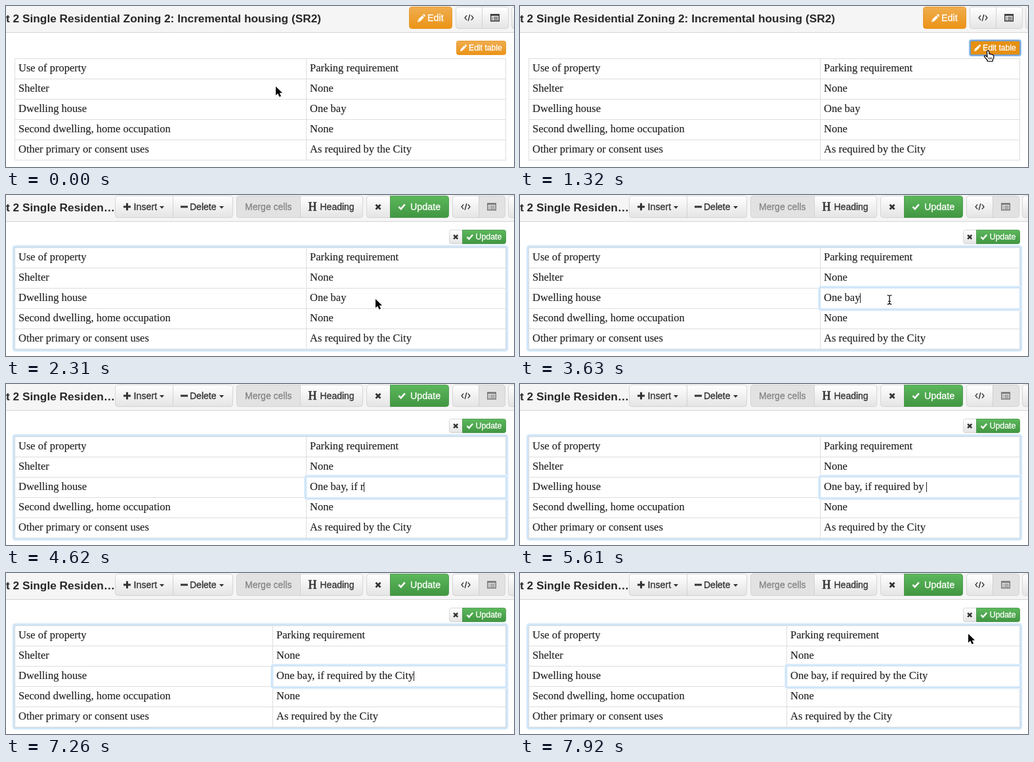
Write an HTML page that moves like this. It is 774 by 246 pixels and loops after 8000 ms.

```html
<!DOCTYPE html>
<html lang="en">
<head>
<meta charset="utf-8">
<title>Table editing</title>
<style>
  html, body { margin: 0; width: 100%; height: 100%; overflow: hidden; background: #fff; }
  svg { display: block; width: 774px; height: 246px; }
  text { white-space: pre; }
  .title { font: bold 17.3px "Liberation Sans", Arial, sans-serif; fill: #282828; }
  .label { font-family: "Liberation Sans", Arial, sans-serif; stroke-width: .3; }
  .cell { font: 16.5px "Liberation Serif", "Times New Roman", serif; fill: #222; stroke: #222; stroke-width: .15; }
</style>
</head>
<body>
<svg id="stage" viewBox="0 0 774 246" xmlns="http://www.w3.org/2000/svg"></svg>
<script>
const STEP = 330, LOOP = 8000;
const DARK = '#333', WHITE = '#fff';
const ROWS = [
  ['Use of property', 'Parking requirement'],
  ['Shelter', 'None'],
  ['Dwelling house', 'One bay'],
  ['Second dwelling, home occupation', 'None'],
  ['Other primary or consent uses', 'As required by the City']
];
const TYPED = ', if required by the City';

// Timelines: [first step, value...]
const typing = [[0, 0], [12, 1], [13, 4], [14, 6], [15, 9], [16, 13], [17, 17], [18, 21], [19, 23], [22, 25]];
const columns = [[0, 457.5], [18, 432.5], [19, 418.5], [22, 406.5]];
const carets = [[0, 0], [8, 1], [10, 0], [11, 1], [21, 0], [22, 1], [23, 0]];
const pointers = [
  [0, 'arrow', 411, 123], [1, 'arrow', 690, 79], [2, 'hand', 713, 68],
  [6, 'arrow', 629, 115], [7, 'arrow', 563, 159], [8, 'beam', 563, 160],
  [12, 'none', 0, 0], [23, 'arrow', 634, 123], [24, 'arrow', 683, 93]
];

const kinds = {
  plain: ['url(#plain)', '#ccc'],
  pressed: ['#e2e2e2', '#ccc'],
  orange: ['url(#orange)', '#e38d13'],
  orangeHot: ['#e68f12', '#c77c11'],
  green: ['url(#green)', '#3e8f3e'],
  greenHot: ['#419641', '#3e8f3e']
};

const gradient = (id, top, bottom) =>
  `<linearGradient id="${id}" x2="0" y2="1"><stop stop-color="${top}"/><stop offset="1" stop-color="${bottom}"/></linearGradient>`;

// Button with separate left and right corner radii
function button(x, y, w, h, kind, l = 4, r = 4) {
  const [fill, stroke] = kinds[kind];
  x += .5; y += .5; w -= 1; h -= 1;
  return `<path d="M${x + l} ${y}H${x + w - r}q${r} 0 ${r} ${r}V${y + h - r}q0 ${r} ${-r} ${r}H${x + l}q${-l} 0 ${-l} ${-l}V${y + l}q0 ${-l} ${l} ${-l}z" fill="${fill}" stroke="${stroke}" stroke-opacity=".75"/>`;
}

const label = (x, y, str, size = 14, fill = DARK) =>
  `<text class="label" x="${x}" y="${y}" font-size="${size}" fill="${fill}" stroke="${fill}">${str}</text>`;

const at = (x, y, body, scale = 1) => `<g transform="translate(${x} ${y}) scale(${scale})">${body}</g>`;
const line = (d, color, width) => `<path d="${d}" fill="none" stroke="${color}" stroke-width="${width}"/>`;

const pencil = `<path d="M0 12L.8 8.3 7.2 1.9 10.1 4.8 3.7 11.2zM8 1.1L9 .1q.6-.5 1.2 0L11.9 1.8q.5.6 0 1.2L10.9 4z" fill="#fff"/><path d="M1.4 9l1.6 1.6" stroke="#ec9a24"/>`;
const check = line('M1 6L4.6 9.6 11.2 2', WHITE, 2.8);
const cross = line('M1 1L8 8M8 1L1 8', DARK, 2.8);
const code = line('M-3.4-3.6L-6.4 0-3.4 3.6M3.4-3.6L6.4 0 3.4 3.6M1.3-5L-1.3 5', DARK, 1.4);
const list = color => line('M-6.3-5H6.3V5H-6.3z', color, 1.4) + line('M-6-4.2H6', color, 2.2) +
  line('M-4.5-1H-3M-2-1H4.6M-4.5 1H-3M-2 1H4.6M-4.5 3H-3M-2 3H4.6', color, 1);
const drop = `<path d="M0 0H7L3.5 4z" fill="${DARK}"/>`;

const viewBar = `<text class="title" x="0" y="24.5">t 2 Single Residential Zoning 2: Incremental housing (SR2)</text>` +
  button(614, 1, 66, 34, 'orange') + at(627, 12.5, pencil) + label(642, 23, 'Edit', 14.3, WHITE) +
  button(685, 1, 41, 34, 'plain', 4, 0) + at(705.5, 18, code) +
  button(725, 1, 41, 34, 'plain', 0, 4) + at(745, 18, list(DARK)) +
  button(770, 1, 40, 34, 'plain');

const editTable = kind => button(686, 53, 76, 22, kind, 3, 3) +
  at(692, 59, pencil, .85) + label(705, 68, 'Edit table', 12.2, WHITE);

const editBar = `<text class="title" x="0" y="24.5">t 2 Single Residen…</text>` +
  button(166, 1, 89, 34, 'plain', 4, 0) + line('M179 18H190M184.5 12.5V23.5', DARK, 3) +
  label(194.5, 23, 'Insert', 14.3) + at(234, 17, drop) +
  button(254, 1, 92, 34, 'plain', 0, 4) + line('M266 18H277', DARK, 3) +
  label(280, 23, 'Delete') + at(325, 17, drop) +
  button(351, 1, 98, 34, 'pressed', 4, 0) + label(364, 23, 'Merge cells', 14, '#848484') +
  button(448, 1, 96, 34, 'plain', 0, 4) +
  `<text x="460.5" y="24" font-family="Liberation Serif, serif" font-size="18" fill="${DARK}" stroke="${DARK}" stroke-width=".7">H</text>` +
  label(478.5, 23, 'Heading') +
  button(549, 1, 37, 34, 'plain', 4, 0) + at(562.5, 13.8, cross) +
  button(585, 1, 90, 34, 'green', 0, 4) + at(597.5, 12.5, check, .92) + label(616, 23, 'Update', 14.3, WHITE) +
  button(680, 1, 41, 34, 'plain', 4, 0) + at(700.5, 18, code) +
  button(720, 1, 41, 34, 'pressed', 0, 4) + at(740, 18, list('#777')) +
  button(765, 1, 40, 34, 'plain');

const updateTable = kind => button(675, 53, 21, 22, 'plain', 3, 0) + at(681.2, 60.2, cross, .88) +
  button(695, 53, 67, 22, kind, 0, 3) + at(701.5, 59, check, .86) + label(715.5, 68, 'Update', 12.4, WHITE);

const frame = (x, y, w, h, color, width) =>
  `<rect x="${x}" y="${y}" width="${w}" height="${h}" rx="2.5" fill="none" stroke="${color}" stroke-width="${width}"/>`;
const glow = (x, y, w, h) => frame(x, y, w, h, '#e8f3fc', 5) + frame(x, y, w, h, '#cde4f8', 2.6);

const beam = 'M-3.5-7Q0-7 0-5V5Q0 7-3.5 7M3.5-7Q0-7 0-5V5Q0 7 3.5 7M-2 2.5H2';
const shapes = {
  arrow: `<path d="M0 0V13.6L3.2 10.6 5.5 15.8 8 14.7 5.8 9.7H10z" fill="#000" stroke="#fff" stroke-width="2" paint-order="stroke" stroke-linejoin="round"/>`,
  hand: `<path d="M-1.6 1.2Q0-1 1.5 1.2L2 5.6Q3.6 4.7 4.5 6 6 5.2 6.8 6.8 8.6 6.2 8.8 8.4V11.5L7.2 14.2V16.5H-.8V15L-5.6 9.4Q-5.8 7.2-3.4 8L-1 10z" fill="#fff" stroke="#000" stroke-width="1.2" stroke-linejoin="round"/>` +
    line('M1.3 10.5V13.6M3.5 10.5V13.6M5.7 10.5V13.6', '#000', .9),
  beam: line(beam, WHITE, 3) + line(beam, '#000', 1.2),
  none: ''
};

const rowLines = ROWS.concat([0]).map((_, i) => `M13 ${80.5 + 31 * i}H762`).join('');
const cells = side => ROWS.map((row, i) =>
  `<text class="cell" x="${side ? 0 : 19}" y="${100 + 31 * i}"${side && i === 2 ? ' id="entry"' : ''}>${row[side]}</text>`).join('');

const $ = id => document.getElementById(id);
$('stage').innerHTML =
  `<defs>${gradient('plain', '#fff', '#e4e4e4')}${gradient('orange', '#f0ad4e', '#eb9316')}${gradient('green', '#5cb85c', '#419641')}</defs>
  <rect width="774" height="246" fill="#fff"/>
  <rect width="774" height="40" fill="#f5f5f5"/>
  <path d="M0 40.5H774" stroke="#d4d4d4"/>
  <g id="view">${viewBar}
    <g id="cool">${editTable('orange')}</g>
    <g id="hot">${editTable('orangeHot')}</g>
    <g id="focus">${frame(685, 52, 78, 24, '#b5d2f2', 2.6)}${frame(685.9, 52.9, 76.2, 22.2, '#6b9fd8', 1.8)}</g>
  </g>
  <g id="edit">${editBar}
    <g id="rest">${updateTable('green')}</g>
    <g id="hover">${updateTable('greenHot')}</g>
    ${glow(11.8, 78.8, 751.4, 158.4)}
  </g>
  ${line(rowLines + 'M13.5 80V236M761.5 80V236', '#ddd', 1)}
  ${cells(0)}
  <g id="column">${line('M-5.5 80V236', '#ddd', 1)}${cells(1)}</g>
  <g id="ring"></g>
  <path id="caret" stroke="#222"/>
  <g id="pointer"></g>`;

const show = (id, on) => $(id).setAttribute('display', on ? 'inline' : 'none');
const pick = (track, step) => track.filter(entry => entry[0] <= step).pop();

function draw(time) {
  const step = Math.floor(time % LOOP / STEP);
  const editing = step >= 5;
  const x = pick(columns, step)[1];
  const left = x + 5.5;

  show('view', !editing);
  show('edit', editing);
  show('cool', step < 2);
  show('hot', step >= 2);
  show('focus', step >= 4);
  show('rest', step > 5);
  show('hover', step === 5);

  $('column').setAttribute('transform', `translate(${left} 0)`);
  const entry = $('entry');
  entry.textContent = ('One bay' + TYPED.slice(0, pick(typing, step)[1])).replace(/ /g, '\u00a0');
  $('ring').innerHTML = step >= 8 ? glow(x - 1.2, 141, 764 - x, 34) : '';

  show('caret', pick(carets, step)[1]);
  const end = Math.floor(left + entry.getComputedTextLength()) + .5;
  $('caret').setAttribute('d', `M${end} 150V165`);

  const [, kind, px, py] = pick(pointers, step);
  $('pointer').innerHTML = at(px, py, shapes[kind]);
}

const start = performance.now();
function tick() {
  draw(performance.now() - start);
  requestAnimationFrame(tick);
}
tick();
</script>
</body>
</html>
```
